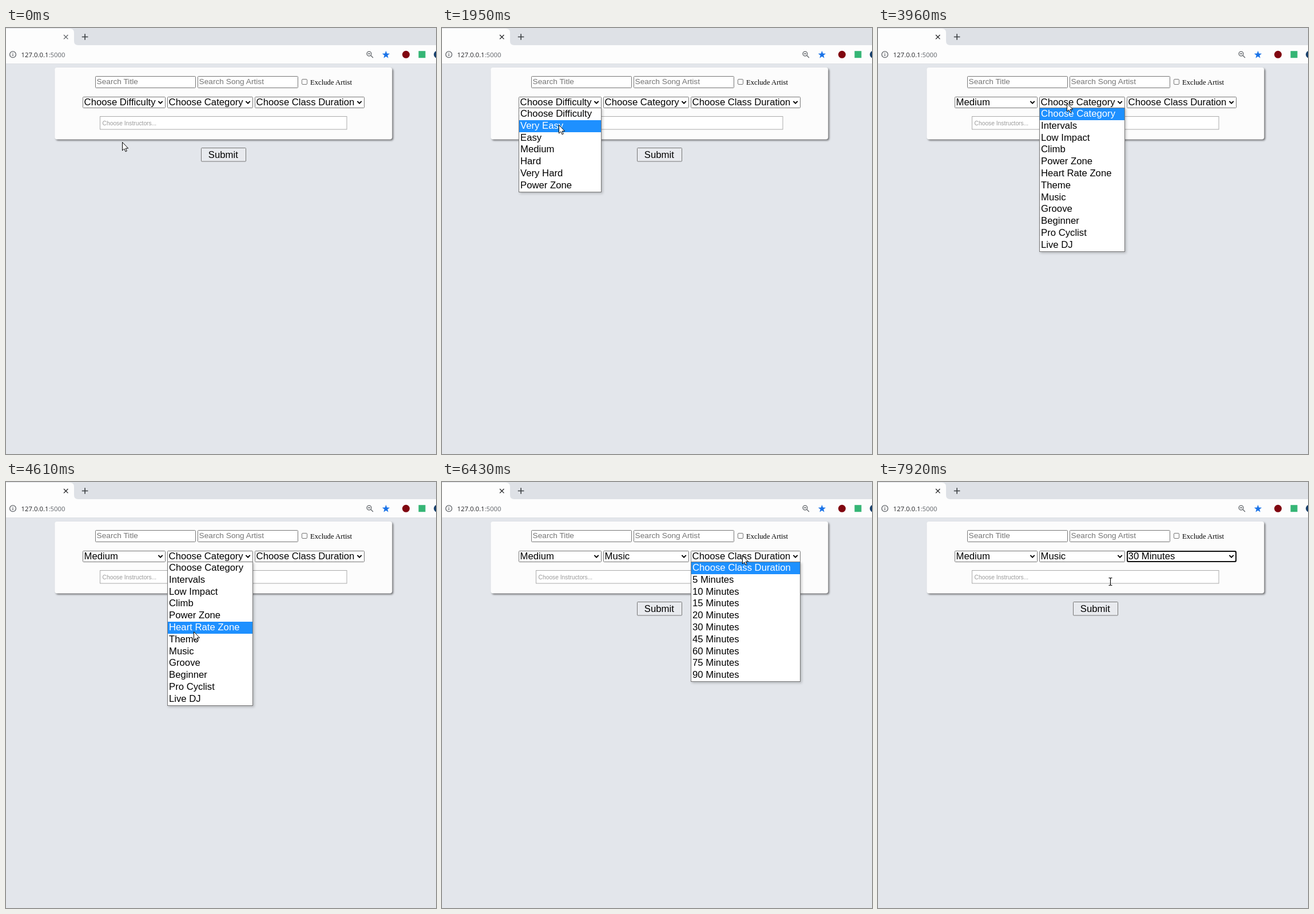
Write an HTML page that moves like this. It is 752 px wide and 744 px high and loops after 8000 ms.

```html
<!DOCTYPE html>
<html lang="en">
<head>
<meta charset="utf-8">
<title>Class search</title>
<style>
html, body { margin: 0; width: 100%; height: 100%; overflow: hidden; background: #e3e6eb; }
svg { display: block; width: 752px; height: 744px; font-family: "Liberation Sans", Arial, sans-serif; }
text { white-space: pre; }
.big { font-size: 16.72px; fill: #000; }
.hint { font-size: 13.7px; fill: #757575; }
.small { font-size: 10.25px; fill: #999; }
.label { font: 12.7px "Liberation Serif", "Times New Roman", serif; }
.url { font: 11.35px "Open Sans", sans-serif; fill: #202124; }
.box { fill: #fff; stroke: #767676; }
.line { fill: none; stroke: #5f6368; stroke-width: 1.3; }
.card { fill: #fcfcfc; filter: drop-shadow(2px 2px 1.5px rgba(0,0,0,.5)); }
.menu { filter: drop-shadow(2px 2px 2px rgba(0,0,0,.22)); }
</style>
</head>
<body>
<svg id="stage" viewBox="0 0 752 744">
  <rect width="752" height="744" fill="#e3e6eb"/>
  <rect width="752" height="31" fill="#dee1e6"/>
  <rect y="30" width="752" height="32" fill="#fdfdfd"/>
  <rect y="62" width="752" height="1" fill="#dcdee2"/>
  <path d="M0 1H111Q119 1 119 8V23Q119 30 126 30H0Z" fill="#fdfdfd"/>
  <path id="close" class="line" d="M101 12l7.4 7.4m0-7.4l-7.4 7.4"/>
  <path class="line" d="M132.8 15.5h10.6m-5.3-5.3v10.6" style="stroke:#3c4043;stroke-width:1.6"/>

  <circle class="line" cx="12" cy="46.3" r="5.4"/>
  <path class="line" d="M12 45.6v3.6m0-6v1.3"/>
  <text class="url" x="26.5" y="50.5">127.0.0.1<tspan fill="#5f6368">:5000</tspan></text>
  <circle class="line" cx="635" cy="45" r="3.9"/>
  <path class="line" d="M633 45h4m1 3l4 4"/>
  <path id="star" fill="#1a73e8"/>
  <circle cx="699.5" cy="46.3" r="6.5" fill="#800610"/>
  <rect x="721.5" y="40.2" width="12" height="12" fill="#35b575"/>
  <circle cx="755" cy="46.3" r="6.8" fill="#123c69"/>

  <rect class="card" x="85.3" y="69" width="590" height="125.5" rx="4"/>
  <rect class="box" x="156.5" y="84.5" width="175" height="20" rx="1"/>
  <rect class="box" x="335.5" y="84.5" width="175" height="20" rx="1"/>
  <text class="hint" x="158.6" y="98">Search Title</text>
  <text class="hint" x="337.6" y="98">Search Song Artist</text>
  <rect class="box" x="517.5" y="89.5" width="9" height="9" rx="1.5"/>
  <text class="label" x="532" y="99">Exclude Artist</text>
  <g id="fields"></g>
  <rect x="164.5" y="154.5" width="431.5" height="22.5" fill="#fff" stroke="#aaa"/>
  <text class="small" x="168.6" y="169.5">Choose Instructors...</text>
  <rect x="341.5" y="209.5" width="78" height="23.5" rx="1" fill="#e8eaee" stroke="#767676"/>
  <text class="big" x="353.8" y="227">Submit</text>
  <g id="menus"></g>
  <path id="arrow" d="M.5 .5V15L3.8 11.9 6.1 16.9 8.3 15.9 6.1 11.1H10.7Z" fill="#fff" stroke="#000"/>
  <path id="beam" d="M-3-6.5h2l1 1 1-1h2M0-5.5v11M-3 6.5h2l1-1 1 1h2" fill="none" stroke="#000" stroke-width="1.1"/>
</svg>
<script>
const LOOP = 8000, TOP = 140, ROW = 20.8;
const $ = id => document.getElementById(id);
const minutes = [5, 10, 15, 20, 30, 45, 60, 75, 90].map(n => n + ' Minutes');

const fields = [
  { x: 134, w: 145, open: 1560, shut: 3030, blur: 3960, pick: 3,
    items: ['Choose Difficulty', 'Very Easy', 'Easy', 'Medium', 'Hard', 'Very Hard', 'Power Zone'] },
  { x: 282, w: 150, open: 3960, shut: 5370, blur: 6310, pick: 7,
    items: ['Choose Category', 'Intervals', 'Low Impact', 'Climb', 'Power Zone', 'Heart Rate Zone',
            'Theme', 'Music', 'Groove', 'Beginner', 'Pro Cyclist', 'Live DJ'] },
  { x: 435, w: 192, open: 6310, shut: 7680, blur: LOOP, pick: 5, fade: 120,
    items: ['Choose Class Duration', ...minutes] }
];

// Pointer moves: first step, last step, number of steps, x, y
const moves = [
  [410, 1300, 7, 204, 129],
  [1690, 1950, 3, 204, 169],
  [2070, 2470, 4, 198, 204],
  [2620, 2620, 1, 198, 205],
  [3160, 3830, 6, 330, 131],
  [4210, 4610, 4, 328, 261],
  [4760, 5120, 4, 328, 289],
  [5490, 6180, 6, 525, 128],
  [6700, 7280, 5, 524, 248],
  [7800, 7800, 1, 470, 214],
  [7920, 7920, 1, 406, 174]
];

function add(parent, tag, attrs, text) {
  const el = document.createElementNS('http://www.w3.org/2000/svg', tag);
  for (const k in attrs) el.setAttribute(k, attrs[k]);
  if (text) el.textContent = text;
  return parent.appendChild(el);
}

const rowY = i => Math.round(TOP + ROW * i);
const show = (el, on) => el.setAttribute('visibility', on ? 'visible' : 'hidden');

function build(f) {
  const { x, w, items } = f, right = x + w;
  f.box = add($('fields'), 'rect', { class: 'box', x: x + .5, y: 120.5, width: w - 1, height: 19, rx: 1 });
  f.ring = add($('fields'), 'rect', { x: x + 1, y: 121, width: w - 2, height: 18, rx: 2.5,
    fill: 'none', stroke: '#101010', 'stroke-width': 2 });
  f.value = add($('fields'), 'text', { class: 'big', x: x + 2.6, y: 135 });
  add($('fields'), 'path', { d: `M${right - 12.6} 127.8l3.7 3.8l3.7-3.8`, fill: 'none',
    stroke: '#000', 'stroke-width': 1.9 });

  f.menu = add($('menus'), 'g', { class: 'menu' });
  add(f.menu, 'rect', { class: 'box', x: x + .5, y: TOP - .5, width: w - 1,
    height: rowY(items.length) - TOP + 1 });
  f.content = add(f.menu, 'g', {});
  f.mark = add(f.content, 'rect', { x: x + 1, width: w - 2, fill: '#1e90ff' });
  f.rows = items.map((s, i) => add(f.content, 'text', { class: 'big', x: x + 3, y: rowY(i) + 15 }, s));
}

function pointer(t) {
  let x = 203, y = 199;
  for (const [a, b, n, tx, ty] of moves) {
    if (t < a) break;
    let p = 1;
    if (t < b) {
      const q = (Math.floor((t - a) / (b - a) * (n - 1) + .001) + 1) / n;
      p = q * q * (3 - 2 * q);
    }
    x += (tx - x) * p;
    y += (ty - y) * p;
  }
  return [Math.round(x), Math.round(y)];
}

function draw(t) {
  const [x, y] = pointer(t), typing = t >= 7920;
  for (const f of fields) {
    const open = t >= f.open && t < f.shut, done = t >= f.shut;
    const hover = !open && x >= f.x && x < f.x + f.w && y >= 120 && y < 140;
    f.box.style.stroke = hover ? '#4f4f4f' : '#767676';
    f.value.textContent = f.items[done ? f.pick : 0];
    show(f.ring, done && t < f.blur);
    show(f.menu, open);
    if (!open) continue;
    const row = Math.max(0, Math.floor((y - TOP) / ROW));
    f.mark.setAttribute('y', rowY(row));
    f.mark.setAttribute('height', rowY(row + 1) - rowY(row));
    f.rows.forEach((el, i) => el.style.fill = i === row ? '#fff' : '#000');
    f.content.setAttribute('opacity', t < f.open + (f.fade || 0) ? .6 : 1);
  }
  $('close').style.stroke = t < 1430 ? '#5f6368' : '#202124';
  show($('arrow'), !typing);
  show($('beam'), typing);
  $(typing ? 'beam' : 'arrow').setAttribute('transform', `translate(${x + (typing ? .5 : 0)} ${y})`);
}

fields.forEach(build);
$('star').setAttribute('d', 'M' + Array.from({ length: 10 }, (_, i) => {
  const r = i % 2 ? 2.9 : 7, a = i * Math.PI / 5;
  return `${(664.5 + r * Math.sin(a)).toFixed(2)} ${(46.8 - r * Math.cos(a)).toFixed(2)}`;
}).join('L') + 'Z');

const start = performance.now();
function tick() {
  draw((performance.now() - start) % LOOP);
  requestAnimationFrame(tick);
}
tick();
</script>
</body>
</html>
```
